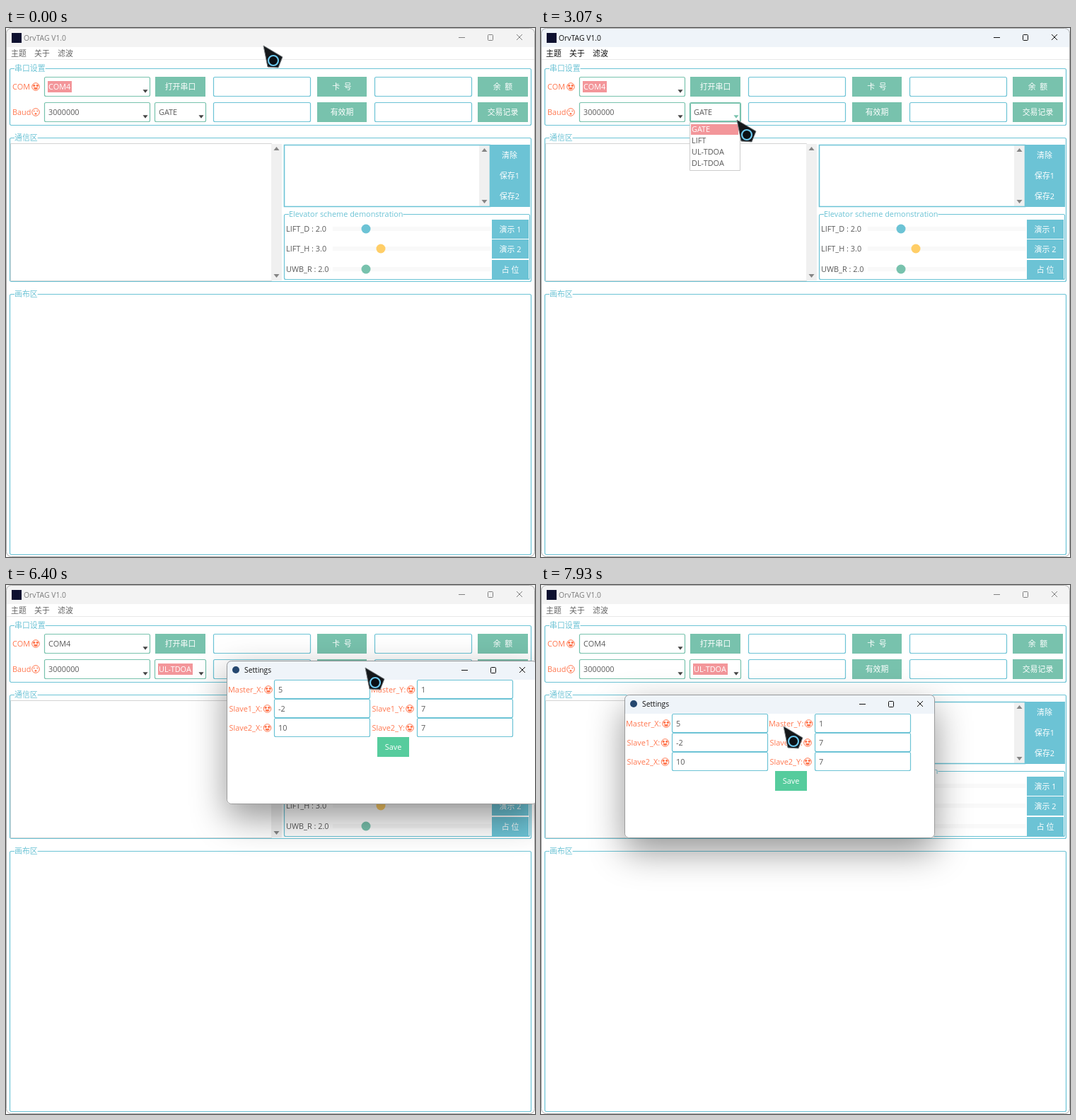
Recreate the animation shown at these times as an HTML page with a canvas. Size 748 by 748 pixels, loop 8000 ms.

```html
<!DOCTYPE html>
<html lang="zh">
<head>
<meta charset="utf-8">
<style>
  html, body { margin: 0; width: 100%; height: 100%; overflow: hidden; background: #fff; }
  canvas { display: block; }
</style>
</head>
<body>
<canvas id="stage" width="748" height="748"></canvas>
<script>
const g = document.getElementById('stage').getContext('2d');
const LOOP = 8000, STEPS_PER_MS = 0.015;
const GREEN = '#78c2ad', PINK = '#f3969a', BLUE = '#6cc3d5', YELLOW = '#ffce67',
      CORAL = '#ff7851', MINT = '#56cc9d', INK = '#5a5a5a';
const FAMILY = '"Open Sans", "Noto Sans CJK SC", "Noto Sans CJK", sans-serif';
const MODES = ['GATE', 'LIFT', 'UL-TDOA', 'DL-TDOA'];

const ACTIVATE = 19, OPEN_LIST = 21, PICK = 64, CARET = 65, SETTINGS = 87;
const POINTER = [[3, 364, 25], [13, 276, 115], [16, 273, 124], [45, 273, 124], [46, 277, 130],
  [57, 257, 170], [69, 257, 170], [73, 640, 180], [74, 800, 190], [86, 956, 90],
  [96, 508, 117], [99, 409, 146], [101, 328, 167], [107, 332, 181], [111, 332, 181],
  [114, 371, 190], [119, 343, 200]];
const DIALOG = [[87, 760, 80], [96, 312, 107], [99, 210, 136], [101, 117, 156], [103, 118, 155]];

function follow(keys, s) {
  if (s <= keys[0][0]) return keys[0].slice(1);
  for (let i = 1; i < keys.length; i++) {
    const [s0, x0, y0] = keys[i - 1], [s1, x1, y1] = keys[i];
    if (s <= s1) {
      const k = (s - s0) / (s1 - s0);
      return [Math.round(x0 + (x1 - x0) * k), Math.round(y0 + (y1 - y0) * k)];
    }
  }
  return keys[keys.length - 1].slice(1);
}

function fill(x, y, w, h, color) {
  g.fillStyle = color;
  g.fillRect(x, y, w, h);
}

function box(x, y, w, h, color, width = 1, radius = 2) {
  g.beginPath();
  g.roundRect(x + 0.5, y + 0.5, w - 1, h - 1, radius);
  g.strokeStyle = color;
  g.lineWidth = width;
  g.stroke();
}

function text(str, x, y, color = INK, align = 'left', size = 10.9) {
  g.font = `${size}px ${FAMILY}`;
  g.textAlign = align;
  g.textBaseline = 'alphabetic';
  g.fillStyle = color;
  g.fillText(str, x, y + 4);
}

function disc(x, y, r, color) {
  g.beginPath();
  g.arc(x, y, r, 0, 7);
  g.fillStyle = color;
  g.fill();
}

function polygon(points, color) {
  g.beginPath();
  points.forEach(([x, y]) => g.lineTo(x, y));
  g.closePath();
  g.fillStyle = color;
  g.fill();
}

function line(x0, y0, x1, y1, color, width = 1) {
  g.beginPath();
  g.moveTo(x0, y0);
  g.lineTo(x1, y1);
  g.strokeStyle = color;
  g.lineWidth = width;
  g.stroke();
}

function triangle(x, y, dir, color, r = 4) {
  polygon([[x - r, y - dir * r / 2], [x + r, y - dir * r / 2], [x, y + dir * r / 2 + dir]], color);
}

function button(label, x, y, w, h, color) {
  fill(x, y, w, h, color);
  text(label, x + w / 2, y + h / 2, '#fff', 'center');
}

function group(label, x, y, w, h) {
  box(x, y, w, h, BLUE, 1.2);
  g.font = `10.9px ${FAMILY}`;
  fill(x + 7, y - 4, g.measureText(label).width, 8, '#fff');
  text(label, x + 7, y, BLUE);
}

function entry(x, y, w, h, value = '', color = BLUE) {
  fill(x, y, w, h, '#fff');
  box(x, y, w, h, color, 1.2);
  text(value, x + 6, y + h / 2);
}

function combo(x, y, w, value, { selected = 0, focus = false, lit = focus } = {}) {
  entry(x, y, w, 28, selected ? '' : value, GREEN);
  if (focus) box(x + 1, y + 1, w - 2, 26, GREEN, 1.2, 1);
  if (selected) {
    fill(x + 5, y + 6, selected, 16, PINK);
    text(value, x + 6, y + 14, '#fff');
  }
  triangle(x + w - 7, y + 20, 1, lit ? GREEN : '#444', 3.5);
}

function face(x, y, surprised) {
  g.beginPath();
  g.arc(x, y, 5.3, 0, 7);
  g.strokeStyle = CORAL;
  g.lineWidth = 1;
  g.stroke();
  const eye = surprised ? 0.9 : 1.7;
  disc(x - 2.3, y - 1.5, eye, CORAL);
  disc(x + 2.3, y - 1.5, eye, CORAL);
  if (surprised) return disc(x, y + 2.3, 1.4, CORAL);
  g.beginPath();
  g.arc(x, y + 1, 3, 0, Math.PI);
  g.fill();
}

function windowControls(x, y, color) {
  line(x - 4, y + 0.5, x + 5, y + 0.5, color);
  box(x + 37, y - 4, 8, 9, color, 1, 1);
  line(x + 78, y - 4, x + 86, y + 4, color);
  line(x + 86, y - 4, x + 78, y + 4, color);
}

function scrollbar(x, y, h) {
  fill(x, y, 15, h, '#f0f0f0');
  triangle(x + 7.5, y + 7, -1, '#858585');
  triangle(x + 7.5, y + h - 7, 1, '#858585');
}

function mainWindow(s, pointer) {
  const active = s >= ACTIVATE && s < SETTINGS;
  const picked = s >= PICK, opened = s >= OPEN_LIST && !picked;

  fill(0, 0, 748, 748, '#fff');
  fill(0, 0, 748, 27, active ? '#eff4f9' : '#f3f3f3');
  fill(8, 7, 14, 14, '#0d1030');
  text('OrvTAG V1.0', 25, 14, active ? '#111' : '#7d7d7d', 'left', 10.4);
  windowControls(644, 13, active ? '#111' : '#808080');
  ['主题', '关于', '滤波'].forEach((m, i) => text(m, 7 + i * 33, 36, active ? '#111' : '#666'));
  fill(0, 44, 748, 1, '#e8e8e8');

  group('串口设置', 5, 57, 738, 81);
  text('COM', 9, 83, CORAL);
  face(42, 83);
  text('Baud', 9, 119, CORAL);
  face(42, 119, true);
  combo(54, 69, 150, 'COM4', { selected: picked ? 0 : 34 });
  combo(54, 105, 150, '3000000');
  combo(210, 105, 73, picked ? 'UL-TDOA' : 'GATE', {
    selected: picked ? 49 : 0,
    focus: active && s > ACTIVATE,
    lit: s >= 13 && s < SETTINGS
  });
  if (s >= CARET && s < SETTINGS && (s - CARET) % 13.5 < 9) fill(264, 112, 1, 15, '#333');
  for (const y of [69, 105]) {
    entry(293, y, 138, 28);
    entry(521, y, 138, 28);
  }
  button('打开串口', 211, 69, 71, 28, GREEN);
  button('卡  号', 440, 69, 70, 28, GREEN);
  button('余  额', 667, 69, 71, 28, GREEN);
  button('有效期', 440, 105, 70, 28, GREEN);
  button('交易记录', 667, 105, 71, 28, GREEN);

  group('通信区', 5, 155, 738, 204);
  box(6, 163, 370, 195, '#d4d4d4', 1, 0);
  scrollbar(375, 164, 193);
  scrollbar(669, 166, 86);
  box(393, 165, 292, 88, BLUE, 1.6, 0);
  fill(684, 165, 57, 88, BLUE);
  ['清除', '保存1', '保存2'].forEach((m, i) => text(m, 712, 180 + i * 29, '#fff', 'center'));

  group('Elevator scheme demonstration', 393, 263, 348, 93);
  [['LIFT_D : 2.0', 284, 509, BLUE, '演示 1'],
   ['LIFT_H : 3.0', 312, 530, YELLOW, '演示 2'],
   ['UWB_R : 2.0', 341, 509, GREEN, '占 位']].forEach(([label, y, knob, color, action]) => {
    text(label, 396, y);
    fill(462, y - 3, 224, 6, '#f9f9f9');
    disc(knob, y, 6.5, color);
    button(action, 687, y - 13, 52, 27, BLUE);
  });

  group('画布区', 5, 376, 738, 369);
  box(0, 0, 748, 748, '#aaa', 1, 7);

  if (opened) {
    fill(210, 133, 72, 69, '#fff');
    box(210, 133, 72, 69, '#ccc', 1, 0);
    const hover = Math.max(0, Math.floor((pointer[1] - 135) / 16));
    MODES.forEach((mode, i) => {
      const y = 143 + i * 16;
      if (i === hover) fill(212, y - 7, 67, 15, PINK);
      text(mode, 213, y, i === hover ? '#fff' : INK);
    });
  }
}

function settings(x, y) {
  g.save();
  g.translate(x, y);
  g.beginPath();
  g.roundRect(0, 0, 439, 203, 6);
  g.save();
  g.shadowColor = 'rgba(0,0,0,.42)';
  g.shadowBlur = 50;
  g.shadowOffsetY = 19;
  g.fillStyle = '#fff';
  g.fill();
  g.restore();
  g.save();
  g.clip();
  fill(0, 0, 439, 27, '#eff4f9');
  g.restore();
  box(0, 0, 439, 203, 'rgba(90,90,90,.6)', 1, 6);
  disc(13, 13, 5, '#25476f');
  text('Settings', 25, 13, '#111', 'left', 10.3);
  windowControls(336, 13, '#111');
  [['Master', '5', '1'], ['Slave1', '-2', '7'], ['Slave2', '10', '7']].forEach(([name, vx, vy], i) => {
    const top = 27 + i * 27, mid = top + 14, inset = i ? 1.5 : 0;
    text(name + '_X:', 2 + inset, mid, CORAL);
    face(59 - inset, mid);
    text(name + '_Y:', 204 + inset, mid, CORAL);
    face(260.5 - inset, mid);
    entry(67, top, 136, 27, vx);
    entry(269, top, 136, 27, vy);
  });
  button('Save', 213, 108, 45, 28, MINT);
  g.restore();
}

function drawPointer([x, y], overText) {
  g.save();
  g.translate(x, y);
  polygon([[0, 0], [27, 16], [21, 31], [6, 30]], '#15181b');
  g.strokeStyle = '#777d80';
  g.lineWidth = 1;
  g.stroke();
  if (overText) {
    line(2, 3, 20, 28, '#5fd0d0', 2);
  } else {
    disc(14, 21, 9, '#0b1015');
    g.beginPath();
    g.arc(14, 21, 7, 0, 7);
    g.strokeStyle = '#6cc8ee';
    g.lineWidth = 2.2;
    g.stroke();
  }
  g.restore();
}

function draw(now) {
  const s = Math.floor((now % LOOP) * STEPS_PER_MS + 0.06);
  const pointer = follow(POINTER, s);
  mainWindow(s, pointer);
  if (s >= SETTINGS) settings(...follow(DIALOG, s));
  drawPointer(pointer, s >= PICK && s < SETTINGS);
}

const start = performance.now();
function tick() {
  draw(performance.now() - start);
  requestAnimationFrame(tick);
}
tick();
</script>
</body>
</html>
```
